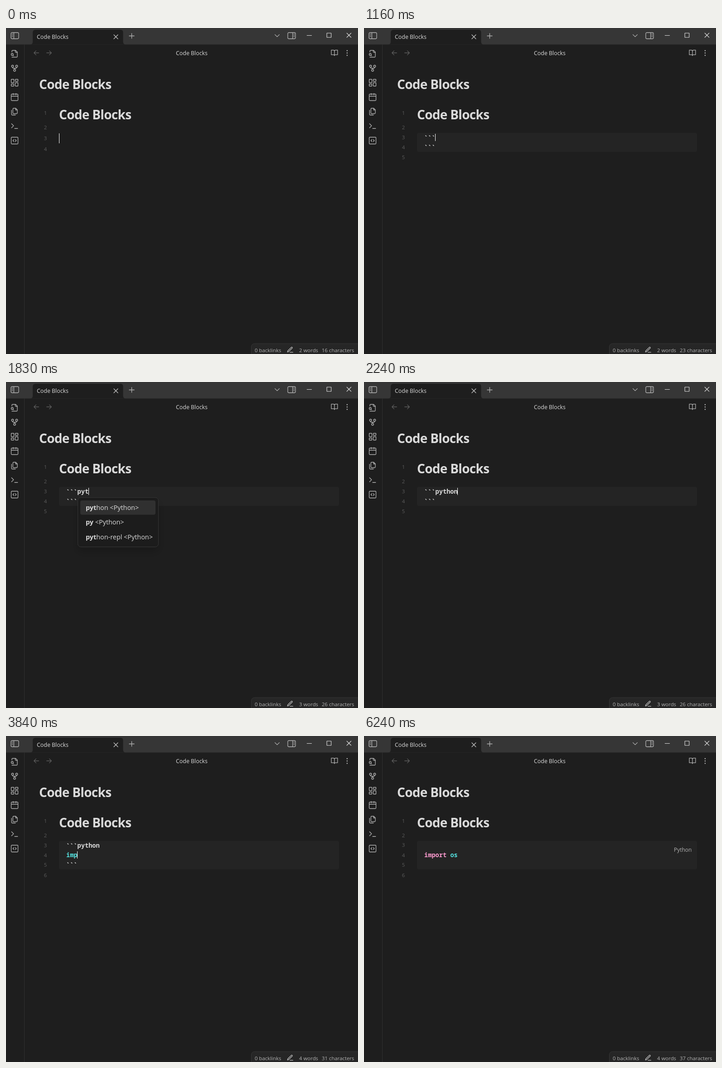
These frames come from a looping animation (777 by 721 pixels, 6.37 s). An HTML page:

```html
<!DOCTYPE html>
<html lang="en">
<head>
<meta charset="utf-8">
<title>Code Blocks</title>
<style>
  html, body { margin: 0; width: 100%; height: 100%; overflow: hidden; background: #1e1e1e; }
  svg { display: block; }
  text { font-family: "Open Sans", "Noto Sans", sans-serif; fill: #dadada; white-space: pre; }
  .ui { font-size: 12.4px; }
  .head { font-size: 28px; font-weight: 700; letter-spacing: -.7px; }
  .num { font-size: 11.4px; fill: #5c5c5c; text-anchor: middle; }
  .status { font-size: 11.4px; fill: #b3b3b3; }
  .item { font-size: 14.4px; }
  .item tspan { font-weight: 700; }
  .code { font: 600 13.67px "Noto Sans Mono", "DejaVu Sans Mono", monospace; }
  .icon { fill: none; stroke-linecap: round; stroke-linejoin: round; }
</style>
</head>
<body>
<svg id="stage" width="777" height="721" viewBox="0 0 777 721">
  <defs>
    <filter id="shadow" x="-30%" y="-30%" width="160%" height="170%">
      <feDropShadow dx="0" dy="10" stdDeviation="9" flood-color="#000" flood-opacity=".18"/>
    </filter>
  </defs>
  <rect width="777" height="721" fill="#1e1e1e"/>
  <rect width="777" height="36.5" fill="#363636"/>
  <path d="M53 36.5q6 0 6-6V10q0-6 6-6H252.500q6 0 6 6v20.500q0 6 6 6z" fill="#1e1e1e"/>
  <path d="M40.500 36.500V721" stroke="#303030"/>
  <g id="icons"></g>
  <text class="ui" x="68" y="24">Code Blocks</text>
  <text class="ui" x="410" y="60" text-anchor="middle">Code Blocks</text>
  <text class="head" x="73" y="135">Code Blocks</text>
  <text class="head" x="117" y="202">Code Blocks</text>
  <g id="editor"></g>
  <path d="M541.500 722V706q0-8 8-8H778V722z" fill="#262626" stroke="#363636"/>
  <text class="status" x="549" y="716.500">0 backlinks</text>
  <text class="status" x="647" y="716.500" id="words"></text>
  <text class="status" x="697" y="716.500" id="chars"></text>
  <g id="pencil"></g>
</svg>
<script>
const $ = id => document.getElementById(id);
const LOOP = 6370, CODE_X = 133, CHAR = 8.2, ROW = 21;
const CYAN = '#53dfdd', PINK = '#fa99cd', PLAIN = '#dadada';

// Icons on a 24 unit grid, centred at (x, y)
const icon = (d, x, y, scale = .75, color = '#b3b3b3', weight = 1.3) =>
  `<path class="icon" d="${d}" transform="translate(${x} ${y}) scale(${scale}) translate(-12 -12)"
    stroke="${color}" stroke-width="${weight / scale}"/>`;
const box = (x, y, w, h, r = 1) =>
  `M${x + r} ${y}h${w - 2 * r}a${r} ${r} 0 0 1 ${r} ${r}v${h - 2 * r}a${r} ${r} 0 0 1 ${-r} ${r}` +
  `h${2 * r - w}a${r} ${r} 0 0 1 ${-r} ${-r}v${2 * r - h}a${r} ${r} 0 0 1 ${r} ${-r}z`;
const ring = (x, y, r) => `M${x - r} ${y}a${r} ${r} 0 1 0 ${2 * r} 0a${r} ${r} 0 1 0 ${-2 * r} 0`;
const cross = 'M5 5l14 14M19 5L5 19';

const ribbon = [
  'M4 22h14a2 2 0 0 0 2-2V7l-5-5H6a2 2 0 0 0-2 2v3M14 2v4a2 2 0 0 0 2 2h4' + ring(5, 14, 3) + 'M9 18l-1.500-1.500',
  ring(12, 18, 3) + ring(6, 6, 3) + ring(18, 6, 3) + 'M18 9v1a2 2 0 0 1-2 2H8a2 2 0 0 1-2-2V9M12 12v3',
  box(2, 2, 8, 10) + box(14, 2, 8, 6) + box(14, 12, 8, 10) + box(2, 16, 8, 6),
  box(2, 3, 20, 19, 2) + 'M16 1v4M8 1v4M2 9h20',
  'M15.500 2H9a2 2 0 0 0-2 2v12a2 2 0 0 0 2 2h9a2 2 0 0 0 2-2V6.500zM3 7.600V20a2 2 0 0 0 2 2h9.400M15 2v5h5',
  'M3 17l6-6-6-6M12 19h9',
  box(2, 2, 20, 20, 2) + 'M10 9l-3 3 3 3M14 15l3-3-3-3'
];
const panel = box(0, 2.5, 24, 19, 3);
$('icons').innerHTML = ribbon.map((d, i) => icon(d, 19, 57 + 32 * i)).join('') + [
  icon(panel + 'M9 2.500v19M3.500 7h2M3.500 11h2M3.500 15h2', 19.5, 17, .71),
  icon(panel + 'M15 2.500v19M18.500 7h2M18.500 11h2M18.500 15h2', 630.5, 17, .71),
  icon(cross, 242.5, 19.5, .64, '#c4c4c4'),
  icon('M12 4v16M4 12h16', 277.5, 17.5, .69),
  icon('M5 8.500l7 7 7-7', 598.5, 17, .69),
  icon('M4 12h16', 669.5, 16.5, .64, '#e0e0e0', 1.1),
  icon(box(4, 4, 16, 16, .5), 713, 16, .6, '#e0e0e0', 1.1),
  icon(cross, 757, 16, .68, '#e0e0e0', 1.1),
  icon('M20 12H4M11 5l-7 7 7 7', 67, 55, .66, '#5c5c5c'),
  icon('M4 12h16M13 5l7 7-7 7', 95, 55, .66, '#5c5c5c'),
  icon('M2 3h6a4 4 0 0 1 4 4v14a3 3 0 0 0-3-3H2zM22 3h-6a4 4 0 0 0-4 4v14a3 3 0 0 1 3-3h7z', 725, 55, .69),
  icon(ring(12, 4.5, .8) + ring(12, 12, .8) + ring(12, 19.5, .8), 753, 55.3, .69, '#b3b3b3', 1.5)
].join('');
$('pencil').innerHTML = icon('M12 21h10M16.500 3.500a2.120 2.120 0 0 1 3 3L7 19l-4 1 1-4z', 627, 711.5, .63, '#c4c4c4');

const menus = {
  p: ['php <PHP>', 'pug <Pug>', 'perl <Perl>', 'pure <Pure>', 'py <Python>', 'po <gettext>',
    'px <PC-Axis>', 'plsql <PL/SQL>', 'parser <Parser>'],
  py: ['py <Python>', 'python <Python>', 'python-repl <Python>'],
  pyt: ['python <Python>', 'py <Python>', 'python-repl <Python>']
};

// Each step changes part of the state and holds until the next one
const steps = [
  [0, { mode: 'blank', lang: '', body: null, caret: 'start', menu: '', words: 2, chars: 16 }],
  [70, { caret: '' }],
  [420, { mode: 'inline', caret: 'tick1' }],
  [620, { caret: 'tick2' }],
  [690, { chars: 18 }],
  [890, { mode: 'block', caret: 'fence', chars: 16 }],
  [1160, { chars: 23 }],
  [1430, { lang: 'p' }],
  [1500, { menu: 'p' }],
  [1560, { words: 3, chars: 24 }],
  [1630, { lang: 'py' }],
  [1690, { menu: 'py' }],
  [1830, { lang: 'pyt', menu: 'pyt', chars: 26 }],
  [2240, { lang: 'python', menu: '' }],
  [2420, { chars: 29 }],
  [2690, { body: '', caret: 'body' }],
  [2890, { chars: 30 }],
  [3240, { caret: '' }],
  [3290, { body: 'i', caret: 'body' }],
  [3510, { body: 'im' }],
  [3640, { words: 4, chars: 31 }],
  [3840, { body: 'imp' }],
  [3910, { chars: 33 }],
  [3980, { body: 'impo' }],
  [4080, { body: 'impor' }],
  [4180, { body: 'import' }],
  [4320, { body: 'import ' }],
  [4380, { chars: 37 }],
  [4840, { caret: '' }],
  [4910, { body: 'import o', caret: 'body' }],
  [5010, { body: 'import os' }],
  [5110, { words: 5, chars: 38 }],
  [5510, { caret: 'close' }],
  [5710, { mode: 'rendered', caret: 'end' }],
  [5780, { words: 4, chars: 37 }],
  [6240, { caret: '' }]
];

const escape = s => s.replace(/</g, '&lt;').replace(/>/g, '&gt;');
const code = (s, column, row, color = PLAIN) =>
  `<text class="code" x="${CODE_X + CHAR * column}" y="${246.7 + ROW * row}" style="fill:${color}">${s}</text>`;
// Backticks hang a little lower than the letters
const ticks = (count, column, row) => code('`'.repeat(count), column, row + .1);

function numbers(s) {
  const rows = {
    blank: [244, 268],
    inline: [243, 267],
    block: s.body === null ? [242, 264, 286] : [242, 264, 284.5, 308],
    rendered: [241, 264, 284.5, 308]
  }[s.mode];
  return [188, 220, ...rows].map((y, i) => `<text class="num" x="87" y="${y + 4}">${i + 1}</text>`).join('');
}

function caret(s) {
  const at = n => Math.round(CODE_X + CHAR * n - .4);
  const spot = {
    start: [117, 233, 22], end: [117, 296, 22],
    tick1: [125, 238, 17], tick2: [133, 238, 17],
    fence: [at(3 + s.lang.length), 234, 16],
    body: [at((s.body || '').length), 255, 16],
    close: [at(3), 276, 16]
  }[s.caret];
  return spot ? `<rect x="${spot[0]}" y="${spot[1]}" width="1" height="${spot[2]}" fill="#fff"/>` : '';
}

function bodyLine(body) {
  if (!body.startsWith('import')) return code(body, 0, 1, CYAN);
  return code('import', 0, 1, PINK) + code(body.slice(7), 7, 1, CYAN);
}

function menu(typed) {
  const items = menus[typed], pitch = 32.4, long = items.length > 3;
  const width = long ? 327.5 : 178, height = long ? 298 : 12 + pitch * items.length;
  const match = long ? 1 : typed.length;
  const label = (s, i) => {
    const n = s.startsWith(typed) ? match : 2;
    return `<text class="item" x="176" y="${283 + pitch * i}"><tspan>${s.slice(0, n)}</tspan>${escape(s.slice(n))}</text>`;
  };
  return `<rect x="158.5" y="255.5" width="${width}" height="${height}" rx="7" fill="#1e1e1e" stroke="#363636" filter="url(#shadow)"/>
    <rect x="164" y="262" width="${width - (long ? 23.5 : 12)}" height="31.5" rx="4" fill="#303030"/>` +
    (long ? '<rect x="475.5" y="259" width="8" height="39" rx="4" fill="#363636"/>' : '') +
    items.map(label).join('');
}

function editor(s) {
  let out = numbers(s);
  if (s.mode === 'inline') out += ticks(2, -2, 0);
  if (s.mode === 'block' || s.mode === 'rendered') {
    const open = s.body !== null;
    out += `<rect x="117" y="232" width="618" height="${open ? 63 : 42}" rx="4" fill="#242424"/>`;
    if (s.mode === 'block') out += ticks(3, 0, 0) + code(s.lang, 3, 0) + ticks(3, 0, open ? 2 : 1);
    else out += '<text x="684" y="255.5" style="font-size:12px;fill:#b3b3b3">Python</text>';
    if (open) out += bodyLine(s.body);
  }
  return out + caret(s) + (s.menu ? menu(s.menu) : '');
}

let shown = -1;
function draw(time) {
  const past = steps.filter(([at]) => at <= time);
  if (past.length === shown) return;
  shown = past.length;
  const state = Object.assign({}, ...past.map(step => step[1]));
  $('editor').innerHTML = editor(state);
  $('words').textContent = state.words + ' words';
  $('chars').textContent = state.chars + ' characters';
}

const began = performance.now();
function tick() {
  draw((performance.now() - began) % LOOP);
  requestAnimationFrame(tick);
}
tick();
</script>
</body>
</html>
```
